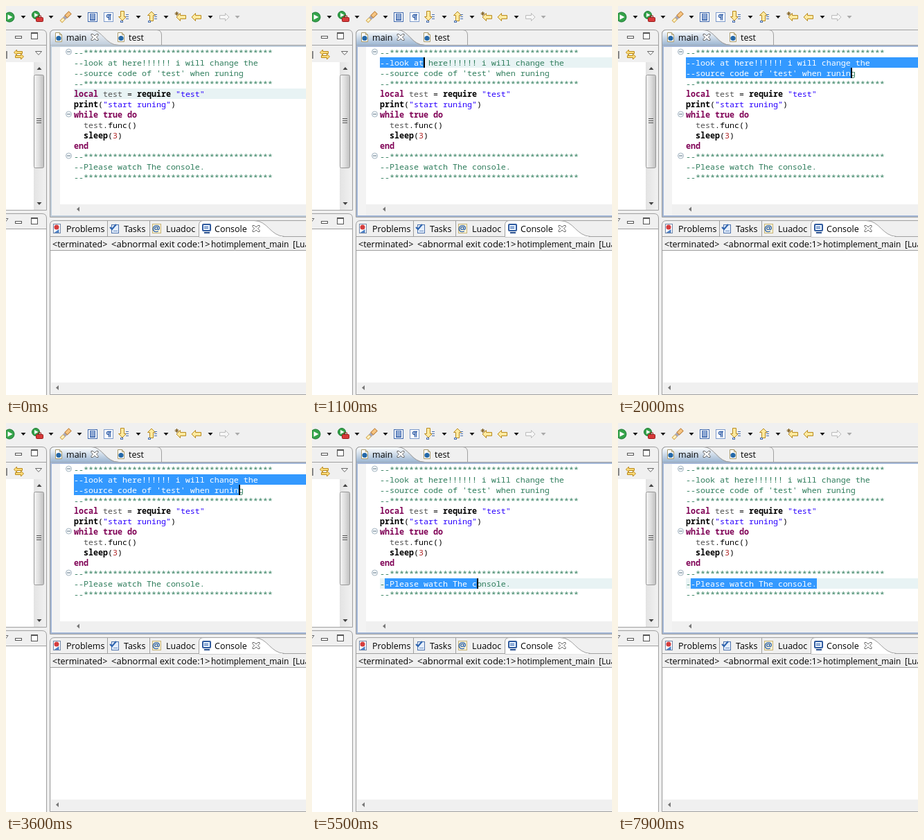
Animation of 433x561 px, one loop 8 s. Source, as an HTML page:

```html
<!DOCTYPE html>
<html lang="en">
<head>
<meta charset="utf-8">
<title>Editor selection</title>
<style>
html, body { margin: 0; width: 100%; height: 100%; overflow: hidden; background: #f0f0f0; }
svg { display: block; }
text { white-space: pre; }
.ui { font: 12.5px "Open Sans", "Noto Sans", sans-serif; }
.code { font: 11.667px "Noto Sans Mono", "DejaVu Sans Mono", monospace; }
.c { fill: #2f7d5c; }
.k { fill: #7f0055; font-weight: bold; }
.f { fill: #000; font-weight: bold; }
.s { fill: #2a00ff; }
.v { fill: #505050; }
.n { fill: #b02828; }
.white tspan { fill: #fff; }
</style>
</head>
<body>
<script>
const LOOP = 8000, LEFT = 98, TOP = 59, CHAR = 7, ROW = 15;
const EDGE = '#a0a0a0';
const rowY = row => TOP + row * ROW;

// Markup helpers
const rect = (x, y, w, h, fill, extra = '') =>
  `<rect x="${x}" y="${y}" width="${w}" height="${h}" fill="${fill}" ${extra}/>`;
const box = (x, y, w, h, fill, stroke, r = 0) =>
  rect(x + .5, y + .5, w - 1, h - 1, fill, `stroke="${stroke}" rx="${r}"`);
const path = (d, fill = 'none', stroke = 'none', width = 1) =>
  `<path d="${d}" fill="${fill}" stroke="${stroke}" stroke-width="${width}"/>`;
const disc = (x, y, r, fill, stroke = 'none') =>
  `<circle cx="${x}" cy="${y}" r="${r}" fill="${fill}" stroke="${stroke}"/>`;
const label = (x, y, s, size = 12.5) =>
  `<text class="ui" x="${x}" y="${y}" style="font-size:${size}px">${s.replace(/</g, '&lt;')}</text>`;
const at = (x, y, s) => `<g transform="translate(${x} ${y})">${s}</g>`;
const grad = (id, stops, vertical = true) =>
  `<linearGradient id="${id}" x2="${vertical ? 0 : 1}" y2="${vertical ? 1 : 0}">` +
  stops.map((c, i) => `<stop offset="${i / (stops.length - 1)}" stop-color="${c}"/>`).join('') +
  '</linearGradient>';

// Code as [class, text] runs
const stars = [['c', '--' + '*'.repeat(39)]];
const source = [
  stars,
  [['c', '--look at here!!!!!! i will change the']],
  [['c', "--source code of 'test' when runing"]],
  stars,
  [['k', 'local '], ['v', 'test'], ['', ' = '], ['f', 'require '], ['s', '"test"']],
  [['f', 'print'], ['', '('], ['s', '"start runing"'], ['', ')']],
  [['k', 'while true do']],
  [['v', '  test'], ['', '.func()']],
  [['f', '  sleep'], ['', '('], ['n', '3'], ['', ')']],
  [['k', 'end']],
  stars,
  [['c', '--Please watch The console.']],
  stars
];
const code = source.map((runs, i) =>
  `<text class="code" x="${LEFT}" y="${rowY(i) + 12}">` +
  runs.map(([cls, s]) => `<tspan class="${cls}">${s}</tspan>`).join('') + '</text>').join('');

// Small icons
const menuArrow = x => path(`M${x - 3.5} 14h7l-3.5 4z`, '#111');
const viewMenu = (x, y) => path(`M${x - 4.5} ${y - 2.5}h9l-4.5 5z`, '#fff', '#666');
const minMax = y => box(13, y, 10, 4, '#fff', '#555') +
  box(36, y - 5, 10, 10, '#fff', '#555') + rect(36, y - 4, 10, 1, '#555');
const closeX = (x, y) => at(x, y, path(
  'M-5-4.5h2.5L0-2 2.5-4.5H5v2L2.5 0 5 2.5v2H2.5L0 2l-2.5 2.5H-5v-2L-2.5 0-5-2.5z', '#fff', '#666'));
const play = (x, y, r) => disc(x, y, r, '#35a34a', '#1d7b35') +
  path(`M${x - r * .35} ${y - r * .55}l${r} ${r * .55}l${-r} ${r * .55}z`, '#fff');
const arrow = (x, y, turn, fill = '#ffeaa0', stroke = '#b98a1e') =>
  `<g transform="translate(${x} ${y}) rotate(${turn})">` +
  path('M-7 0L-1.5-5.5V-2.5H6.5V2.5H-1.5V5.5z', fill, stroke) + '</g>';
const slimArrow = (x, y, turn) =>
  `<g transform="translate(${x} ${y}) rotate(${turn})">` +
  path('M-6.5 0L-2.5-4V-1.5H5.5V1.5H-2.5V4z', '#ffdc78', '#b98a1e') + '</g>';
const fileIcon = (x, y) => at(x, y,
  path('M-4.5-6.5h6l3 3v10h-9z', '#fff', '#a99a6a') + path('M1.5-6.5v3h3', 'none', '#a99a6a') +
  disc(0, 1.5, 3.6, '#2468a8'));
const fold = row => at(90.5, rowY(row) + 7, disc(0, 0, 4, '#f4f8fb', '#a4b4c0') +
  path('M-2.5 0h5', 'none', '#5f7482'));
const lines = (x, y, w, n, gap, color) =>
  path(Array.from({length: n}, (_, i) => `M${x} ${y + i * gap}h${w}`).join(''), 'none', color);

const toolbar =
  play(5, 16, 7) + menuArrow(25) +
  play(43, 13, 5.5) + box(43, 16, 11, 7, '#d83a3a', '#971d1d', 1) + path('M46.5 16v-2h4v2', 'none', '#971d1d') +
  menuArrow(65) +
  `<g transform="translate(86 16) rotate(-45)">` + rect(-9, -2, 6, 4, '#fff3c4', 'stroke="#d6ad57"') +
  rect(-3, -2.5, 4, 5, '#a9a6b4') + rect(1, -2.5, 8, 5, '#f7c583', 'stroke="#c08440"') + '</g>' +
  menuArrow(106) +
  box(118, 9, 14, 14, '#fff', '#3f68ad') + box(121, 11, 8, 10, '#dce7f8', '#3f68ad') +
  lines(122, 13.5, 6, 4, 2, '#3f68ad') +
  box(141, 9, 14, 14, '#fff', '#7c9acb') +
  path('M150 12.5h-2.5a2 2 0 0 0 0 4h.5M148.5 12.5v8M150.5 12.5v8M148 12.5h4', 'none', '#2f5da8', 1.3) +
  arrow(168, 14, -90) + lines(173, 12.5, 4, 3, 3, '#4a70b0') + box(165, 21, 4, 3, '#fff', '#4a70b0') + menuArrow(191) +
  arrow(210, 15, 90) + lines(214, 12.5, 4, 3, 3, '#4a70b0') + box(205, 21, 4, 3, '#fff', '#4a70b0') + menuArrow(231) +
  arrow(253, 16, 0) + path('M246.5 8v6M243.5 11h6M244.5 9l4 4M248.5 9l-4 4', 'none', '#7c5a18') +
  arrow(275, 16, 0) + menuArrow(295) +
  arrow(315, 16, 180, '#f6f6f6', '#bcbcbc') + path('M330.5 14h7l-3.5 4z', '#aaa');

const leftPanels =
  path('M-5 34.5H52Q58.5 34.5 58.5 41V294.5H-5z', '#f0f0f0', EDGE) +
  rect(0, 56, 58, 1, EDGE) + minMax(43) +
  slimArrow(18, 67, 0) + slimArrow(19, 73, 180) + rect(0, 65, 2, 11, '#888') + viewMenu(47, 68) +
  rect(0, 81, 40, 213, '#fff') + rect(40, 81, 16, 213, 'url(#track)') +
  path('M44.5 92h7l-3.5-4zM44.5 283h7l-3.5 4z', '#444') +
  box(40, 99, 15, 135, 'url(#thumb)', '#979797', 2) + lines(44, 162.5, 7, 3, 3, '#555') +
  path('M-5 299.5H52Q58.5 299.5 58.5 306V570H-5z', '#f0f0f0', EDGE) +
  rect(0, 321, 58, 1, EDGE) + rect(0, 322, 58, 240, '#fff') + minMax(310) +
  path('M-3 306.5h6l-3 4z', '#fff', '#666');

const tabShape = 'M63.5 57V41Q63.5 34.5 70 34.5H123C140 34.5 143 56.5 163 56.5V57z';
const editor =
  path('M63.5 304.5V41Q63.5 34.5 70 34.5H440V304.5z', '#f0f0f0', EDGE) +
  path('M64 56.5H433M218 34.5Q224.5 35 224.5 42V56', 'none', EDGE) +
  path(tabShape, 'url(#blur)', EDGE) +
  '<g id="focus">' + path(tabShape, 'url(#active)', EDGE) + '</g>' +
  '<g id="frame">' + rect(64, 57, 369, 247, 'currentColor') + '</g>' +
  fileIcon(76, 45) + label(87, 50, 'main') + closeX(128, 45) + fileIcon(166, 45) + label(177, 50, 'test') +
  rect(66, 59, 367, 243, '#fff') + rect(66, 59, 12, 243, '#f3f3f3') +
  rect(78, 286, 355, 16, '#f0f0f0') + path('M106 289.5v7l-4-3.5z', '#777');

const consolePanel =
  path('M63.5 560.5V316Q63.5 309.5 70 309.5H440V560.5z', '#f0f0f0', EDGE) +
  path('M64 332.5H433M146.5 310v22M207.5 310v22', 'none', EDGE) +
  path('M278.5 333V316Q278.5 309.5 285 309.5H358C378 309.5 381 331.5 402 332.5z', '#fff', EDGE) +
  rect(279, 332, 120, 1, '#fff') +
  box(68, 314, 11, 14, '#fff', '#7187a8') + disc(73, 319, 3.5, '#d53d3d') + path('M69.5 327l7-5v5z', '#4b7fc4') +
  box(152, 315, 11, 13, '#e4eefb', '#4f74ae') + path('M150 319l3 3 6-7', 'none', '#2b62ae', 2) +
  lines(155, 324.5, 6, 1, 2, '#6b8fc4') +
  box(211, 314, 13, 14, '#fff6d8', '#c6b377') +
  '<text class="ui" x="211" y="325" style="font-size:13px;font-weight:bold" fill="#2b62ae">@</text>' +
  box(283, 314, 13, 11, '#3a68b0', '#28508f', 1) + rect(285, 316, 9, 7, '#e8f2ff') +
  lines(286, 318.5, 6, 2, 2, '#3a68b0') + rect(286, 326, 8, 2, '#28508f') +
  label(87, 326, 'Problems') + label(170, 326, 'Tasks') + label(231, 326, 'Luadoc') + label(301, 326, 'Console') +
  closeX(361, 321) +
  label(67, 348, '<terminated>') + label(152, 348, '<abnormal exit code:1>', 13) +
  label(296, 348, 'hotimplement_main', 11.9) + label(414, 348, '[Lua', 11.9) +
  rect(64, 352, 369, 1, EDGE) + rect(65, 353, 368, 190, '#fff') +
  rect(65, 543, 368, 16, '#f0f0f0') + path('M76 547v7l-4-3.5z', '#777');

document.body.innerHTML =
  '<svg width="433" height="561" viewBox="0 0 433 561"><defs>' +
  grad('blur', ['#f4f6fa', '#bfcddb']) + grad('active', ['#ffffff', '#99b4d1']) +
  grad('track', ['#e3e3e3', '#f0f0f0'], false) + grad('thumb', ['#f5f5f5', '#dedede', '#bfbfbf'], false) +
  '<clipPath id="picked"><path id="pickedShape"/></clipPath></defs>' +
  rect(0, 0, 433, 561, '#f0f0f0') + toolbar + leftPanels + editor + consolePanel +
  rect(LEFT, 0, 335, ROW, '#e8f3f4', 'id="current"') + [0, 6, 10].map(fold).join('') + code +
  '<g clip-path="url(#picked)" class="white">' + rect(0, 0, 433, 561, '#3399ff') + code + '</g>' +
  rect(0, 0, 2, ROW, '#000', 'id="caret"') + '</svg>';

const el = id => document.getElementById(id);
const blinks = [2400, 2800, 3200, 3600, 3900, 4300, 6400, 6800, 7200, 7600, 7900];

// Caret position, selection start and highlighted row at time t
function stateAt(t) {
  if (t < 600) return {line: 4};
  if (t < 900) return {line: 1, row: 1, col: 0, from: 0};
  if (t < 4700) {
    const n = Math.floor((t - 900) / 100);
    return n < 3 ? {line: 1, row: 1, col: 3 * n + 3, from: 0}
                 : {row: 2, col: Math.min(34, 3 * n + 3), from: 0, above: true};
  }
  const n = Math.floor((t - 4700) / 100);
  if (n < 1) return {line: 11};
  const col = n <= 8 ? 1 + (n - 1) * 19 / 7 : Math.min(27, 20 + (n - 8) * 1.4);
  return {line: 11, row: 11, col: Math.round(col), from: 1};
}

function draw(now) {
  const t = now % LOOP, {line, row, col, from, above} = stateAt(t);
  const focused = t >= 500, lit = blinks.filter(b => b <= t).length % 2 === 0;
  el('focus').setAttribute('visibility', focused ? 'visible' : 'hidden');
  el('frame').setAttribute('color', focused ? '#a2b6d6' : '#bfcddb');
  el('current').setAttribute('visibility', line === undefined ? 'hidden' : 'visible');
  if (line !== undefined) el('current').setAttribute('y', rowY(line));
  el('caret').setAttribute('visibility', row !== undefined && lit ? 'visible' : 'hidden');
  let shape = '';
  if (row !== undefined) {
    const x = LEFT + col * CHAR, start = LEFT + from * CHAR;
    el('caret').setAttribute('x', x);
    el('caret').setAttribute('y', rowY(row));
    shape = `M${start} ${rowY(row)}H${x}v${ROW}H${start}z`;
    if (above) shape += `M${LEFT} ${rowY(row - 1)}H433v${ROW}H${LEFT}z`;
  }
  el('pickedShape').setAttribute('d', shape);
}

const begin = performance.now();
function tick() {
  draw(performance.now() - begin);
  requestAnimationFrame(tick);
}
tick();
</script>
</body>
</html>
```
